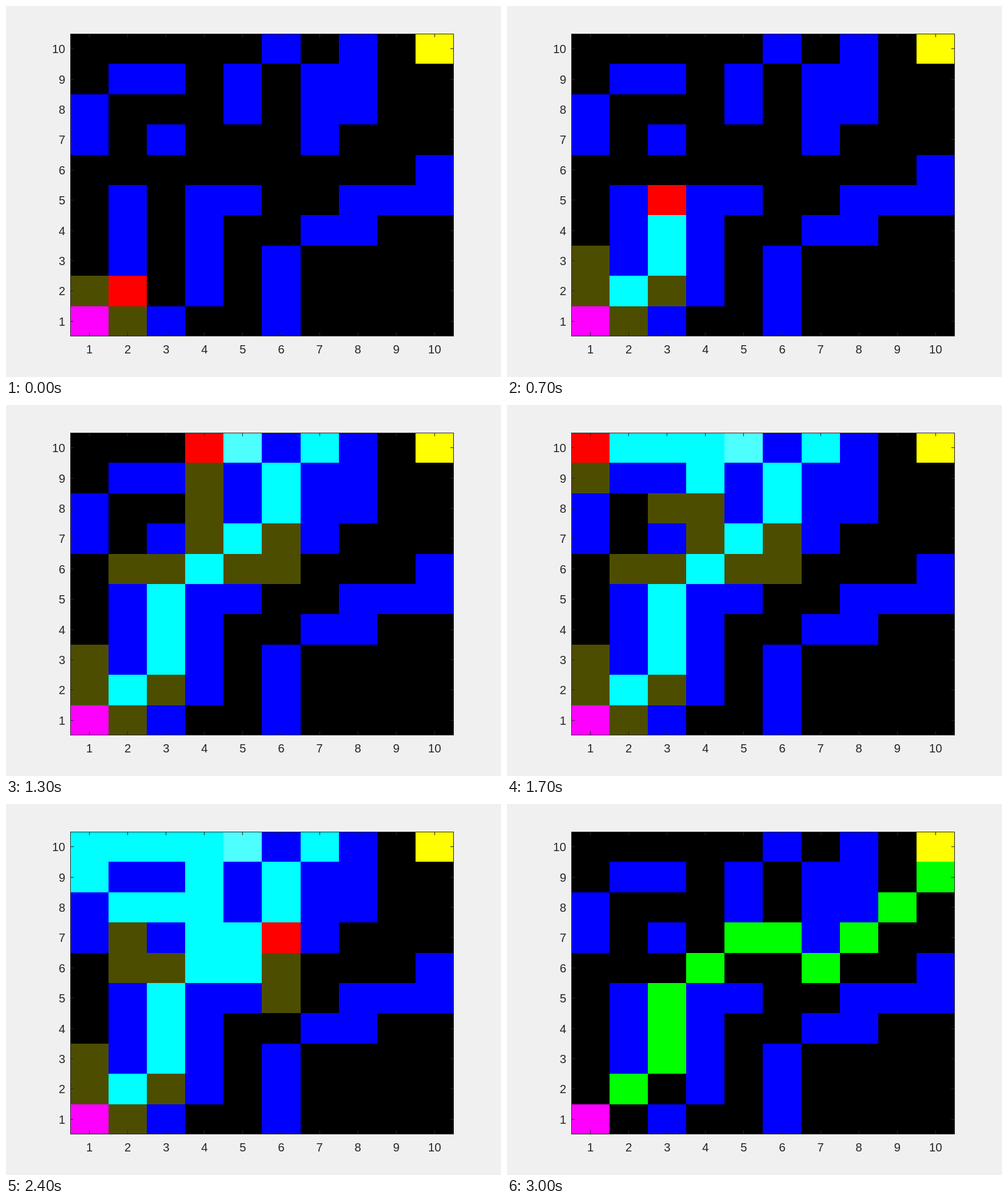
These frames come from a looping animation (840 px wide and 630 px high, 4 s). An HTML page:

```html
<!DOCTYPE html>
<html lang="en">
<head>
<meta charset="utf-8">
<title>Grid search</title>
<style>
  html, body { margin: 0; width: 100%; height: 100%; overflow: hidden; background: #f0f0f0; }
  svg { display: block; width: 100vw; height: 100vh; }
  text { font: 20px "Liberation Sans", Arial, sans-serif; fill: #262626; }
</style>
</head>
<body>
<svg id="stage" viewBox="0 0 840 630">
  <g id="cells" shape-rendering="crispEdges"></g>
  <path id="axes" fill="none" stroke="#262626" shape-rendering="crispEdges"/>
  <g id="labels"></g>
</svg>
<script>
const N = 10, LOOP = 4000, HOLD = 500, STEP = 100;
const FREE = '#000', WALL = '#00f', START = '#f0f', GOAL = '#ff0', OPEN = '#4d4d00',
      HEAD = '#f00', DONE = '#0ff', SKIPPED = '#4dffff', ROUTE = '#0f0';

// Wall columns per row, from row 1 upwards.
const walls = [[3, 6], [4, 6], [2, 4, 6], [2, 4, 7, 8], [2, 4, 5, 8, 9, 10],
               [10], [1, 3, 7], [1, 5, 7, 8], [2, 3, 5, 7, 8], [6, 8]];

const id = (x, y) => (y - 1) * N + x - 1;
const col = i => i % N + 1;
const row = i => Math.floor(i / N) + 1;
const start = id(1, 1), goal = id(N, N);
const distance = i => 2 * N - col(i) - row(i);

function emptyGrid() {
  const grid = Array(N * N).fill(FREE);
  walls.forEach((xs, r) => xs.forEach(x => { grid[id(x, r + 1)] = WALL; }));
  grid[start] = START;
  grid[goal] = GOAL;
  return grid;
}

function neighbours(i) {
  const list = [];
  for (let dx = 1; dx >= -1; dx--) {
    for (let dy = 1; dy >= -1; dy--) {
      const x = col(i) + dx, y = row(i) + dy;
      if ((dx || dy) && x >= 1 && x <= N && y >= 1 && y <= N) list.push(id(x, y));
    }
  }
  return list;
}

// Depth-first search that always takes the neighbour nearest to the goal.
function search() {
  const grid = emptyGrid(), parent = {}, visited = new Set([start]);
  const trail = [start], states = [];
  let blocked = false;
  while (trail.length) {
    const here = trail[trail.length - 1];
    const options = neighbours(here).filter(i => grid[i] !== WALL && !visited.has(i));
    if (grid[here] === HEAD) grid[here] = DONE;
    if (!options.length) {
      trail.pop();
      blocked = true;
      continue;
    }
    for (const i of options) {
      if (!(i in parent)) parent[i] = here;
      if (i !== goal) grid[i] = OPEN;
    }
    const next = options.reduce((a, b) => distance(b) < distance(a) ? b : a);
    visited.add(next);
    trail.push(next);
    if (blocked) {
      grid[next] = SKIPPED;
      blocked = false;
      continue;
    }
    grid[next] = HEAD;
    states.push(grid.slice());
    if (next === goal) break;
  }
  const solved = emptyGrid();
  for (let i = parent[goal]; i !== start; i = parent[i]) solved[i] = ROUTE;
  states.push(solved);
  return states;
}

const $ = name => document.getElementById(name);
function add(group, tag, attrs, text = '') {
  const el = document.createElementNS('http://www.w3.org/2000/svg', tag);
  for (const key in attrs) el.setAttribute(key, attrs[key]);
  el.textContent = text;
  $(group).append(el);
  return el;
}

const edgeX = k => Math.round(109 + 65.09 * k);
const edgeY = k => Math.round(560.95 - 51.4 * k);

const cells = emptyGrid().map((_, i) => {
  const x = edgeX(col(i) - 1), y = edgeY(row(i));
  return add('cells', 'rect', {
    x, y, width: edgeX(col(i)) - x, height: edgeY(row(i) - 1) - y
  });
});

let axes = 'M109.5 47.5H759.5V560.5H109.5Z';
for (let k = 1; k <= N; k++) {
  const cx = 109 + 65.09 * (k - 0.5), cy = 560.95 - 51.4 * (k - 0.5);
  const tx = Math.floor(cx) + 0.5, ty = Math.floor(cy) + 0.5;
  axes += `M${tx} 560v-6M${tx} 47v6M109 ${ty}h6M760 ${ty}h-6`;
  add('labels', 'text', { x: cx, y: 590, 'text-anchor': 'middle' }, k);
  add('labels', 'text', { x: 100.5, y: Math.round(cy + 7.5), 'text-anchor': 'end' }, k);
}
$('axes').setAttribute('d', axes);

const states = search();
let shown = -1;

function render(time) {
  const t = time % LOOP;
  const n = t < HOLD ? 0 : Math.min(states.length - 1, Math.floor((t - HOLD) / STEP) + 1);
  if (n !== shown) {
    cells.forEach((cell, i) => cell.setAttribute('fill', states[n][i]));
    shown = n;
  }
}

const begin = performance.now();
function tick() {
  render(performance.now() - begin);
  requestAnimationFrame(tick);
}
tick();
</script>
</body>
</html>
```
